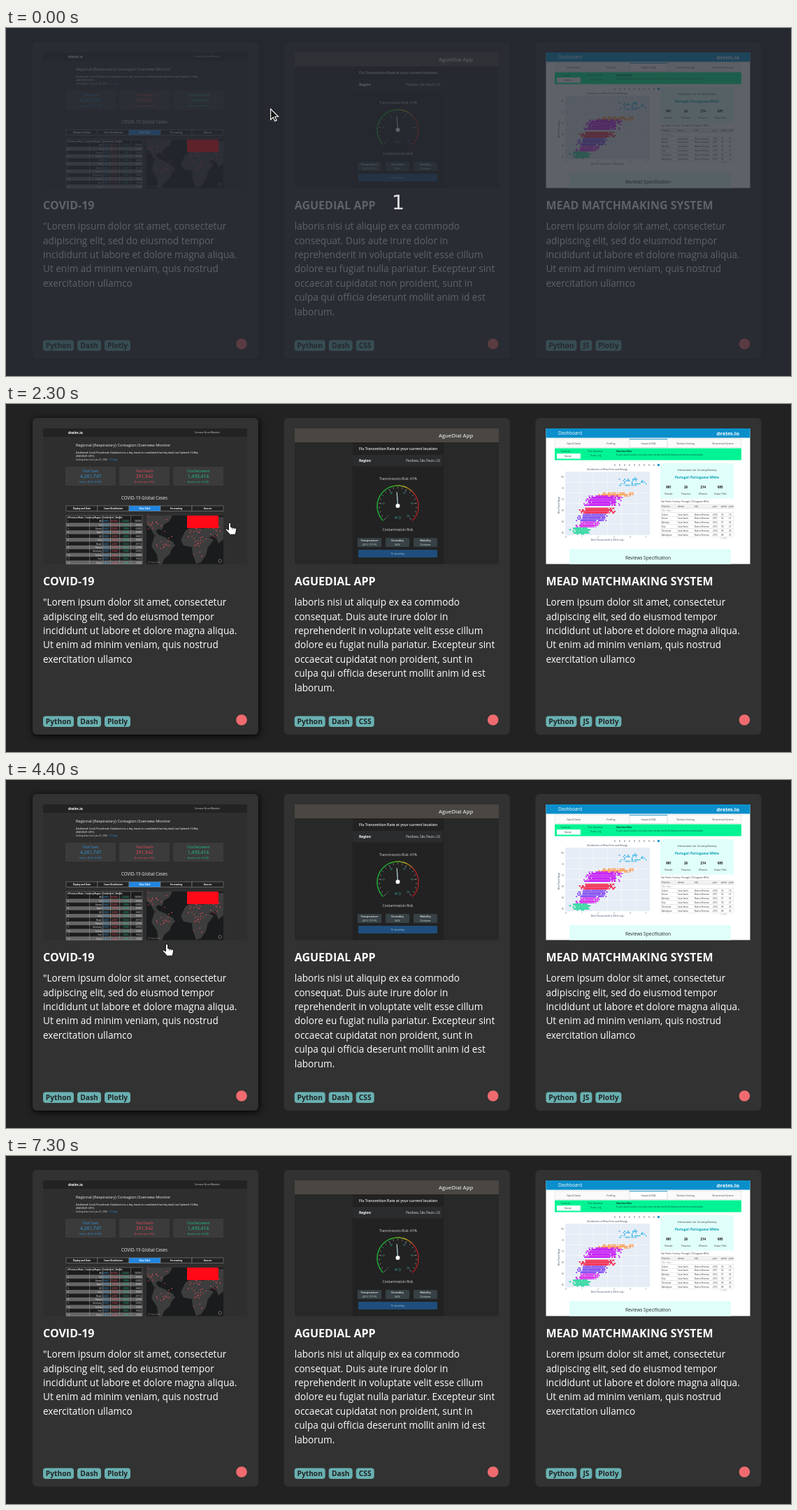
An HTML page that plays this animation: 1123x499 px, repeating every 7.9 s.

```html
<!DOCTYPE html>
<html lang="en">
<head>
<meta charset="utf-8">
<title>Project cards</title>
<style>
html, body { margin: 0; width: 100%; height: 100%; overflow: hidden; background: #222; }
svg { display: block; width: 1123px; height: 499px; font-family: "Open Sans", "Noto Sans", sans-serif; }
text { white-space: pre; }
.hover { filter: drop-shadow(1px 2px 5px #000); }
</style>
</head>
<body>
<svg id="stage" viewBox="0 0 1123 499" xmlns="http://www.w3.org/2000/svg"></svg>
<script>
const LOOP = 7900, COUNTDOWN = 300, GONE = 7300;
const PITCH = 359.7, CARD = { x: 38, y: 20, w: 323, h: 454 };

let seed = 11;
const rand = () => (seed = (seed * 16807) % 2147483647) / 2147483647;
const spread = () => rand() + rand() + rand() - 1.5;

const rect = (x, y, w, h, fill, more = '') =>
  `<rect x="${x}" y="${y}" width="${w}" height="${h}" fill="${fill}" ${more}/>`;
const text = (x, y, size, str, fill = '#fff', more = '') =>
  `<text x="${x}" y="${y}" font-size="${size}" fill="${fill}" ${more}>${str}</text>`;
const MID = 'text-anchor="middle"', END = 'text-anchor="end"', BOLD = 'font-weight="700"';
const mid = (x, y, size, str, fill, more = '') => text(x, y, size, str, fill, MID + ' ' + more);
const shape = (d, fill, more = '') => `<path d="${d}" fill="${fill}" ${more}/>`;
const dots = (n, size, color, place) => {
  let d = '';
  for (let i = 0; i < n; i++) {
    const [x, y] = place(i);
    d += `M${x.toFixed(1)} ${y.toFixed(1)}h${size}`;
  }
  return shape(d, 'none', `stroke="${color}" stroke-width="${size}"`);
};

function outbreakTable() {
  let s = rect(86, 160, 109, 69.5, '#1c1c1c');
  const cols = [[119, '#ddd'], [147, '#3aa0e8'], [160, '#ef5360'], [176, '#29c596'], [194, '#ddd']];
  const places = 'All,US,Russia,Spain,UK,Italy,Brazil,France,Germany,Turkey,Iran,China'.split(',');
  s += text(88, 163.7, 2.8, '# Province/State | Country/Region | Confirmed | Deaths', '#eee', BOLD);
  places.forEach((p, i) => {
    const y = 165 + i * 5.4;
    if (i % 2) s += rect(86, y, 109, 5.4, '#666');
    s += text(137, y + 4.1, 3, p, '#eee', END);
    cols.forEach(([x, color], k) => {
      if (k) s += text(x, y + 4.1, 3, Math.round(9e5 / (i + 1) / (k + 1)), color, END);
    });
    s += text(88, y + 4.1, 3, i + 1, '#ddd');
  });
  for (const x of [119, 138, 149, 162, 178])
    s += rect(x, 160, .5, 69.5, '#999');
  return s + rect(86, 160, 109, 69.5, 'none', 'stroke="#888" stroke-width=".5"');
}

function outbreakMap() {
  const land = '#3d3d3d';
  const spots = [[212, 172, 14, 9], [222, 202, 13, 17], [270, 184, 15, 9], [277, 203, 12, 16], [297, 176, 12, 12]];
  return rect(201, 160, 110, 69.5, '#191b1c')
    + shape('M201 160h37l-4 8-8 5-3 8-5-2-4 4 6 6 5 2-4 2-9-5-5-9-6-6z', land)
    + shape('M212 190l8-2 9 4 10 6 3 5-5 5-3 8-7 5-4 9h-5l-2-14-8-12 2-7z', land)
    + shape('M257 181l10-4 18 2 5 12 7 4-8 10-3 12-7 10-7 2-5-14-1-10-12-2-4-8z', land)
    + shape('M258 175l4-13h49v32l-7 6-5-12-9 3-8-14-10-4-8 4z', land)
    + dots(75, 1.3, '#e5485a', i => {
      const [x, y, w, h] = spots[i % 5];
      return [Math.min(308, Math.max(203, x + spread() * w)), y + spread() * h];
    })
    + rect(259, 160, 45, 18, '#ff0a16')
    + '<circle cx="306" cy="225" r="2.2" fill="#111" stroke="#aaa" stroke-width=".6"/>'
    + text(203, 228, 3, '(c) map data', '#888');
}

function outbreakThumb() {
  let s = rect(53, 35, 292, 194.5, '#2e2e2e') + rect(53, 35, 292, 12, '#232323')
    + text(89, 43, 5, 'drelm.io', '#fff', BOLD)
    + text(306, 42.4, 3.6, 'Corona Virus Monitor', '#ddd', END)
    + text(100, 61, 5.7, 'Regional (Respiratory) Contagion Overview Monitor', '#eee')
    + text(100, 71.2, 3.25, 'Dashboard: Covid-19 outbreak. (Updated once a day, based on consolidated last day data) Last Updated: 12-May', '#ddd', 'font-weight="600"')
    + text(100, 76, 3.25, '2020 00:01 (UTC).', '#ddd', 'font-weight="600"')
    + text(100, 81, 3.1, 'Getting data since: Jan 22, 2020', '#ddd')
    + text(147, 81, 3.1, '111 days', '#2c97de');
  [['Cases', '4,261,747', 'Today: +85,321 (2.00%)', '#2c97de'],
   ['Deaths', '291,942', 'Mortality rate: 6.85%', '#ea4b58'],
   ['Recovered', '1,493,414', 'Recovery rate: 35.04%', '#1fc08e']].forEach(([name, n, note, color], i) => {
    const x = 85 + i * 77;
    s += rect(x, 90, 72, 27, '#3b3b3b') + mid(x + 36, 97.6, 4.4, 'Total ' + name, color)
      + mid(x + 36, 106.3, 6.8, n, color) + mid(x + 36, 113, 3, note, color);
  });
  s += mid(198, 137, 6.2, 'COVID-19 Global Cases', '#eee');
  ['Display and Data', 'Cases Distribution', 'Data Table', 'Forecasting', 'Sources'].forEach((name, i) => {
    const on = i === 2;
    s += rect(86 + i * 45, 146, 45, 7.6, on ? '#1e86e4' : '#222', 'stroke="#888" stroke-width=".6"')
      + mid(108.5 + i * 45, 151, 3, name, '#fff', BOLD);
  });
  return s + outbreakTable() + outbreakMap();
}

function gauge(cx, cy, r) {
  const at = (k, q) => {
    const a = (135 + 270 * k) * Math.PI / 180;
    return `${(cx + q * Math.cos(a)).toFixed(2)} ${(cy + q * Math.sin(a)).toFixed(2)}`;
  };
  let s = '';
  const n = 45;
  for (let i = 0; i < n; i++) {
    const k = i / n;
    const hue = k < .4 ? 130 : Math.max(0, 130 - (k - .4) * 430);
    s += shape(`M${at(k, r)}L${at(k + 1 / n, r)}`, 'none', `stroke="hsl(${hue},70%,42%)" stroke-width="1.4"`);
  }
  for (let i = 0; i <= 20; i++)
    s += shape(`M${at(i / 20, r - 2)}L${at(i / 20, r - (i % 4 ? 4 : 6))}`, 'none', 'stroke="#bcbcbc" stroke-width=".6"');
  for (let i = 0; i <= 5; i++) {
    const [x, y] = at(i / 5, r - 9).split(' ');
    s += mid(x, +y + 1, 3, i * 20, '#48b0a0');
  }
  return s + shape(`M${cx} ${cy}L${cx - 1.3} ${cy - 20}`, 'none', 'stroke="#b9d5df" stroke-width="1.2"')
    + `<circle cx="${cx}" cy="${cy - .5}" r="3" fill="#fff"/>`
    + mid(cx, cy + 18.4, 4.5, '41.0', '#3fb6b0');
}

function fluThumb() {
  let s = rect(413, 35, 292, 194.5, '#282828') + rect(413, 35, 292, 20, '#4a4742')
    + rect(496, 55, 130, 174.5, '#222')
    + text(619, 48, 7.6, 'AgueDial App', '#d8d8d8', 'font-weight="600"')
    + mid(561, 66, 5.2, 'Flu Transmition Rate at your current location', '#eee', 'font-weight="600"')
    + rect(496, 73, 129, 16.5, '#2b2c2d', 'rx="2"')
    + text(505, 83, 5, 'Region', '#fff', BOLD)
    + text(621, 83, 4.5, 'Perdizes, São Paulo, US', '#ddd', END)
    + mid(561, 109, 5, 'Transmission Risk: 41%', '#ddd')
    + gauge(560.5, 146.5, 29.5)
    + mid(560.5, 182.3, 4.8, 'Contamination Risk', '#ddd');
  [['Temperature', '22°C (71°F)'], ['Humidity', '54%'], ['Mobility', 'Outdoor']].forEach(([a, b], i) => {
    const x = 503 + i * 40;
    s += rect(x, 192, 34, 13, '#364145', 'rx="1.5"')
      + mid(x + 17, 197.4, 4, a, '#eee', 'font-weight="600"') + mid(x + 17, 202.5, 4, b, '#ddd');
  });
  return s + rect(504, 209, 113, 11, '#1f4e7c', 'rx="1"') + mid(560.5, 216.2, 3.8, 'Probability', '#9fc6e8');
}

function scatter() {
  // colour, centre x, centre y, half width, half height, count
  const bands = [
    ['#36b7e8', 893, 112, 23, 6, 45], ['#ff9a4d', 872, 130, 24, 2, 150],
    ['#c400f5', 852, 139, 20, 7, 620], ['#f5143c', 845, 153, 19, 4, 520],
    ['#7a3cf0', 838, 163, 17, 5, 420], ['#d41ee8', 832, 173, 13, 4, 250],
    ['#15d392', 821, 182, 11, 4, 260]
  ];
  let s = rect(800, 97, 121, 91, '#e6edf6');
  for (let i = 1; i < 6; i++)
    s += rect(800 + i * 20, 97, .5, 91, '#fff') + rect(800, 97 + i * 15, 121, .5, '#fff');
  for (const [color, cx, cy, w, h, n] of bands)
    s += dots(n, 1.7, color, () => {
      const y = Math.round((cy + (rand() * 2 - 1) * h) / 2.2) * 2.2;
      const x = cx + spread() * w - (y - cy) * .4;
      return [Math.min(919, Math.max(802, x)), Math.min(187, y)];
    });
  for (let i = 0; i < 6; i++)
    s += mid(801 + i * 23, 191.5, 2.6, i, '#555') + text(798, 186 - i * 16, 2.6, 80 + i * 4, '#555', END);
  return s + mid(860, 94.5, 3.3, 'Distribution of Wine Price and Ratings', '#345')
    + mid(860, 196, 2.8, 'Wine Price per bottle in US$ (in Log)', '#345')
    + mid(0, 0, 2.8, 'Wine Points Range', '#345', 'transform="translate(791.5 145) rotate(-90)"')
    + dots(9, 2, '#a5adb8', i => [870 + i * 7, 87.5]) + dots(1, 3, '#1d97d4', () => [932, 87.5]);
}

function wineThumb() {
  let s = rect(772.5, 35, 292, 194.5, '#fff') + rect(772.5, 35, 292, 13.5, '#098fcb')
    + text(790, 44, 6.6, 'Dashboard', '#fff')
    + text(1049, 45.2, 7.8, 'drelm.io', '#fff', END + ' ' + BOLD)
    + rect(785, 50, 267, 12.5, '#fafafa', 'stroke="#ddd" stroke-width=".6"')
    + rect(892, 50, 54, 12.5, '#fff', 'stroke="#ccc" stroke-width=".6"')
    + rect(892, 50, 54, .8, '#098fcb');
  ['Data &amp; Detail', 'Profiling', 'Graphs &amp; EDA', 'Reviews Cleaning', 'Recommend System'].forEach((name, i) => {
    s += mid(812 + i * 53.4, 57.7, 3.2, name, '#444');
  });
  s += rect(785, 63.5, 267, 17, '#00f394')
    + text(794, 68.7, 3, 'Countries', '#154') + text(832, 68.7, 3, 'Price Optimizer', '#154')
    + rect(788, 71, 34, 7.5, '#fff') + text(799, 76, 3, 'Variety', '#333')
    + text(836, 74.5, 3, 'Linear  Log', '#154')
    + text(873, 68.7, 3, 'Selection Filter', '#033', BOLD)
    + text(873, 74.2, 3, 'To get started choose a Country, then narrow the list by Variety and see the results below', '#154')
    + scatter()
    + rect(936, 85, 105, 51, '#e1fffa')
    + mid(988.5, 95.5, 3.8, 'Information for Country/Variety', '#333')
    + mid(988.5, 106.5, 4.6, 'Portugal: Portuguese White', '#0aa0b8', BOLD);
  [['991', 'Reviews'], ['26', 'Provinces'], ['214', 'Wineries'], ['695', 'Unique Titles']].forEach(([n, name], i) => {
    const x = 948 + i * 24.6;
    s += mid(x, 120.5, 4.4, n, '#111', BOLD) + mid(x, 130, 3, name, '#333');
  });
  s += text(937, 141, 3, 'Top Points: Country: Portugal | Portuguese White', '#333');
  const rows = ['Province', 'filter data...', 'Lisboa', 'Douro', 'Alentejo', 'Tejo', 'Península', 'Alentejano'];
  rows.forEach((name, i) => {
    const y = 144 + i * 5.8;
    s += rect(937, y, 104, 5.8, i ? '#fff' : '#f2f2f2', 'stroke="#d5d5d5" stroke-width=".4"')
      + text(938, y + 4, 2.9, name, i === 1 ? '#999' : '#333');
    if (i === 1) return;
    const cells = i ? ['Casa Santa', 'Branco Reserva', 2008 + i, 95 - i, 12 + i * 3] : ['winery', 'title', 'year', 'points', 'price'];
    cells.forEach((c, k) => { s += text([961, 985, 1011, 1023, 1034][k], y + 4, 2.9, c, '#333'); });
  });
  return s + mid(1027, 193.5, 3, '‹  1 / 9  ›', '#666')
    + rect(806, 208, 231, 21.5, '#e1fffa')
    + mid(918.5, 223, 6.6, 'Reviews Specification', '#222');
}

const LOREM = ['Lorem ipsum dolor sit amet, consectetur', 'adipiscing elit, sed do eiusmod tempor',
  'incididunt ut labore et dolore magna aliqua.', 'Ut enim ad minim veniam, quis nostrud', 'exercitation ullamco'];
const cards = [
  { title: 'COVID-19', thumb: outbreakThumb, body: ['"' + LOREM[0], ...LOREM.slice(1)],
    tags: [['Python', 44], ['Dash', 34], ['Plotly', 37]] },
  { title: 'AGUEDIAL APP', thumb: fluThumb,
    body: ['laboris nisi ut aliquip ex ea commodo', 'consequat. Duis aute irure dolor in',
      'reprehenderit in voluptate velit esse cillum', 'dolore eu fugiat nulla pariatur. Excepteur sint',
      'occaecat cupidatat non proident, sunt in', 'culpa qui officia deserunt mollit anim id est', 'laborum.'],
    tags: [['Python', 44], ['Dash', 34], ['CSS', 26]] },
  { title: 'MEAD MATCHMAKING SYSTEM', thumb: wineThumb, body: LOREM,
    tags: [['Python', 44], ['JS', 17], ['Plotly', 37]] }
];

function drawCard(card, i) {
  const left = 53 + i * PITCH;
  let s = rect(CARD.x + i * PITCH, CARD.y, CARD.w, CARD.h, '#323232', 'rx="6" class="card"')
    + card.thumb() + text(left, 260, 16, card.title, '#fff', BOLD);
  card.body.forEach((line, k) => { s += text(left, Math.round(289.2 + k * 20.4), 13.6, line); });
  let x = left;
  for (const [name, w] of card.tags) {
    s += rect(x, 447.5, w, 15.5, '#69b0b1', 'rx="4"') + mid(x + w / 2, 459, 10.2, name, '#222', BOLD);
    x += w + 5;
  }
  return s + `<circle cx="${left + 284}" cy="453" r="7.8" fill="#ef6b6f"/>`;
}

const stage = document.getElementById('stage');
stage.innerHTML = rect(0, 0, 1123, 499, '#222') + cards.map(drawCard).join('')
  + '<g id="count">' + rect(0, 0, 1123, 499, 'rgb(38,42,50)', 'fill-opacity=".74"')
  + mid(561, 260, 29, '1', '#dcdddf', 'font-family="DejaVu Sans, sans-serif"') + '</g>'
  + '<g id="cursor">'
  + shape('M.6 1V16.4L4.2 13 6.7 18.6 9.2 17.5 6.8 12H11.6Z', '#111', 'id="arrow" stroke="#fff" stroke-width="1.1"')
  + '<g id="hand" stroke="#111" stroke-width="1">'
  + shape('M-1.6 1.9a1.6 1.6 0 0 1 3.2 0V6.5l6 1.2q2 .5 2 2.2l-.8 5-1 2.3H.2l-1.5-2-4.3-4.6q-.6-1.8 1-1.7l3 1.8Z', '#fff')
  + shape('M3.8 7v2.6M6.4 7.6v2.3', 'none', 'stroke-width=".7"') + '</g></g>';

const get = id => document.getElementById(id);
const backs = [...document.querySelectorAll('.card')];

// time, x, y, and where needed: lit card and hand shown
const path = [
  [0, 378, 115], [500, 378, 115], [700, 415, 117], [800, 425, 118], [1300, 425, 118],
  [1400, 406, 116, -1, false], [1500, 340, 130], [1900, 215, 165], [2100, 215, 165],
  [2300, 320, 170], [2400, 440, 178], [2900, 877, 203], [3000, 877, 203],
  [3300, 770, 215], [3400, 700, 222], [3800, 560, 232], [3900, 520, 236],
  [4000, 464, 237, 1, false], [4100, 385, 240], [4200, 320, 239], [4400, 230, 235],
  [4900, 230, 235], [5100, 345, 222], [5200, 450, 212], [5400, 710, 188], [5500, 710, 188],
  [5700, 840, 185], [5800, 840, 185], [5900, 765, 190], [6000, 680, 196], [6200, 495, 207],
  [6300, 495, 207], [6400, 402, 200, 0, false], [6500, 402, 200, 0, false],
  [6600, 330, 175], [6900, 90, 42], [7000, 50, 17], [7100, 50, 17], [7200, 32, 7], [LOOP, 32, 7]
];

const cardAt = (x, y) => backs.findIndex((_, i) => {
  const dx = x - CARD.x - i * PITCH, dy = y - CARD.y;
  return dx >= 0 && dx <= CARD.w && dy >= 0 && dy <= CARD.h;
});

function pose(t) {
  const k = path.findIndex(p => p[0] > t) - 1;
  const [t0, x0, y0, lit, hand] = path[k], [t1, x1, y1] = path[k + 1];
  const f = (t - t0) / (t1 - t0);
  const x = x0 + (x1 - x0) * f, y = y0 + (y1 - y0) * f;
  const on = lit ?? cardAt(x, y);
  return { x, y, on, hand: hand ?? on >= 0 };
}

function draw(ms) {
  const t = Math.floor(ms / 100) * 100;
  const { x, y, on, hand } = pose(t);
  const show = (id, yes) => get(id).setAttribute('display', yes ? 'inline' : 'none');
  show('count', t < COUNTDOWN);
  show('cursor', t < GONE);
  show('hand', hand);
  show('arrow', !hand);
  get('cursor').setAttribute('transform', `translate(${x} ${y})`);
  backs.forEach((b, i) => b.classList.toggle('hover', t < GONE && i === on));
}

const start = performance.now();
function tick() {
  draw((performance.now() - start) % LOOP);
  requestAnimationFrame(tick);
}
tick();
</script>
</body>
</html>
```
